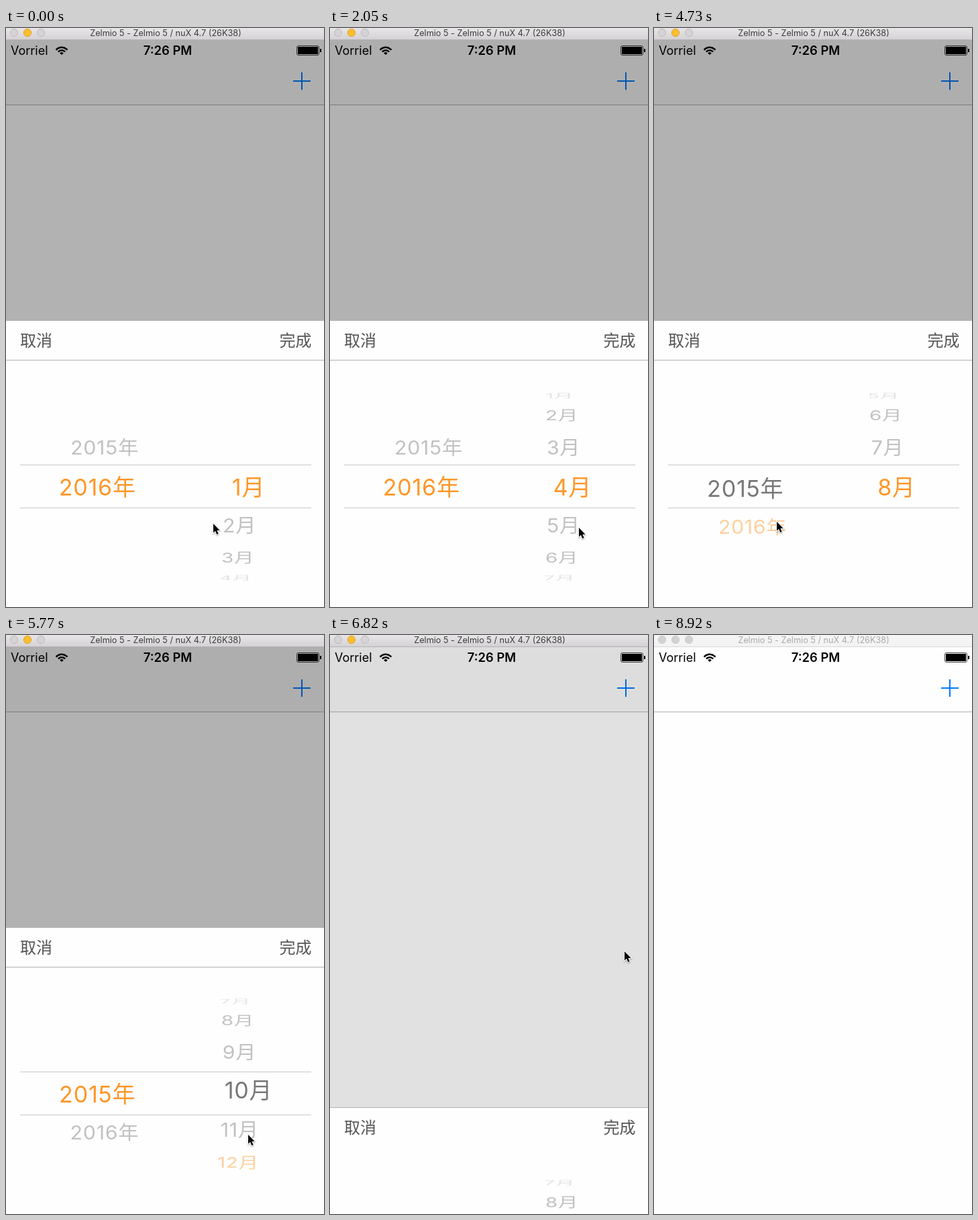
Recreate the animation shown at these times as an HTML page with a canvas. Size 474 by 862 pixels, loop 9.02 s.

```html
<!DOCTYPE html>
<html lang="zh">
<head>
<meta charset="utf-8">
<title>Month picker</title>
<style>
html, body { margin: 0; width: 100%; height: 100%; overflow: hidden; background: #fefefe; }
canvas { display: block; }
</style>
</head>
<body>
<canvas id="stage" width="474" height="862"></canvas>
<script>
const W = 474, H = 862, LOOP = 9020;
const ctx = document.getElementById('stage').getContext('2d');
const FONT = "Inter, 'Noto Sans CJK SC', 'Noto Sans CJK', 'Noto Sans CJK JP', sans-serif";
const ORANGE = '#ff9626', GRAY = '#777', LINE = '#b2b2b2';

// The picture is redrawn in ticks of about 149 ms; all times below are in ticks.
const tickAt = ms => Math.floor((ms + 45) / 149);

function ease(n, start, end) {
  const u = end > start ? Math.min(1, Math.max(0, (n - start) / (end - start))) : +(n >= end);
  return u * u * (3 - 2 * u);
}
const mix = (a, b, u) => a + (b - a) * u;

// Swipes that turn a wheel; fractional goals are overscrolls that spring back.
const swipe = (start, end, to) => ({ start, end, to });
const MONTH = [swipe(4, 10, 4), swipe(14, 17, 6), swipe(19, 22, 8.73), swipe(22, 26, 8),
  swipe(34, 34, 12), swipe(36, 39.4, 10)];
const YEAR = [swipe(28, 32, 2014.96), swipe(32, 34, 2015)];

const turned = (swipes, from, n) =>
  swipes.reduce((pos, s) => mix(pos, s.to, ease(n, s.start, s.end)), from);
// A row counts as chosen once the wheel has come to rest on it.
const chosen = (swipes, from, n) =>
  swipes.reduce((row, s) => n >= s.end && Number.isInteger(s.to) ? s.to : row, from);

// The pointer glides from place to place and rests in between.
const glide = (start, end, x, y) => ({ start, end, x, y });
const POINTER = [glide(0, 4, 355, 745), glide(4, 7, 362, 605), glide(8, 13, 371, 744),
  glide(14, 16, 380, 622), glide(16, 19, 376, 745), glide(19, 22, 364, 581), glide(23, 28, 180, 628),
  glide(28, 32, 183, 735), glide(32, 36, 358, 625), glide(36, 39, 361, 744), glide(40, 44, 439, 471),
  glide(47, 51, 438, 101), glide(53, 56, 300, 745)];
const pointerAt = n => POINTER.reduce((p, g) => {
  const u = ease(n, g.start, g.end);
  return { x: mix(p.x, g.x, u), y: mix(p.y, g.y, u) };
}, { x: 309, y: 738 });

function rect(x, y, w, h, color) {
  ctx.fillStyle = color;
  ctx.fillRect(x, y, w, h);
}
function label(str, x, y, size, color, align = 'left', weight = 400) {
  ctx.font = `${weight} ${size}px ${FONT}`;
  ctx.textAlign = align;
  ctx.fillStyle = color;
  ctx.fillText(str, x, y);
}
function disc(x, y, r, fill, stroke) {
  ctx.beginPath();
  ctx.arc(x, y, r, 0, 7);
  ctx.fillStyle = fill;
  ctx.fill();
  ctx.lineWidth = 1;
  ctx.strokeStyle = stroke;
  ctx.stroke();
}

function drawTitleBar(active) {
  const g = ctx.createLinearGradient(0, 0, 0, 17);
  g.addColorStop(0, active ? '#e8e6e8' : '#f5f5f5');
  g.addColorStop(1, active ? '#d4d2d4' : '#f3f3f3');
  rect(0, 0, W, 17, g);
  rect(0, 17, W, 1, active ? '#b4b2b4' : '#d6d6d6');
  for (const x of [12, 32, 52]) {
    if (active && x === 32) disc(x, 7, 5.6, '#fdbe2f', '#e0a023');
    else if (active) disc(x, 7, 5.6, '#d5d3d5', '#bcbabc');
    else disc(x, 7, 5.6, '#d2d2d2', '#cbcbcb');
  }
  label('Zelmio 5 - Zelmio 5 / nuX 4.7 (26K38)', 238, 12, 12.7, active ? '#3c3c3c' : '#a9a9a9', 'center');
}

function drawStatusBar() {
  label('Vorriel', 7, 40, 18, '#000');
  label('7:26 PM', 241, 40, 18.4, '#000', 'center', 600);

  const cx = 83, cy = 40, from = -Math.PI * 0.77, to = -Math.PI * 0.23;
  ctx.strokeStyle = '#000';
  ctx.lineWidth = 2.4;
  for (const r of [6.8, 11.2]) {
    ctx.beginPath();
    ctx.arc(cx, cy, r, from, to);
    ctx.stroke();
  }
  ctx.beginPath();
  ctx.moveTo(cx, cy);
  ctx.arc(cx, cy, 3.7, from, to);
  ctx.fill();

  ctx.lineWidth = 0.75;
  ctx.beginPath();
  ctx.roundRect(433.5, 26.5, 33, 14, 2.5);
  ctx.stroke();
  rect(435, 28, 30, 11, '#000');
  rect(468, 31, 2, 5, '#000');
}

function drawScreen(slide) {
  rect(0, 18, W, H, '#fefefe');
  rect(0, 18, W, 96, slide < 1 ? '#f9f9f9' : '#fefefe');
  rect(0, 114, W, 1, LINE);
  rect(428, 78, 26, 2, '#007aff');
  rect(440, 66, 2, 26, '#007aff');
  rect(0, 18, W, H, `rgba(0,0,0,${0.3 * (1 - slide)})`);
  drawStatusBar();
}

// Rows on a cylinder; coordinates are relative to the centre of the selection band.
const RADIUS = 158.4, ROW_ANGLE = 24 * Math.PI / 180, DEPTH = 1700, SMALL = 0.9;
function drawColumn(col, magnified) {
  for (let row = col.first; row <= col.last; row++) {
    const angle = (row - col.pos) * ROW_ANGLE;
    if (Math.abs(angle) > 1.5) continue;
    const cos = Math.cos(angle);
    const near = DEPTH / (DEPTH + RADIUS * (1 - cos));
    ctx.save();
    ctx.translate(col.x * near, RADIUS * Math.sin(angle));
    ctx.scale(near, cos);
    ctx.letterSpacing = '0.8px';
    ctx.globalAlpha = magnified ? 1 : 0.45 * Math.min(1, cos * 1.5);
    label(row + col.unit, 0, 13, 34, row === col.chosen ? ORANGE : GRAY, 'center');
    ctx.restore();
  }
}
function drawWheels(columns) {
  const bands = [[495, 155, false], [650, 65, true], [715, 147, false]];
  for (const [y, h, magnified] of bands) {
    ctx.save();
    ctx.beginPath();
    ctx.rect(0, y, W, h);
    ctx.clip();
    ctx.translate(237, 682.5);
    if (!magnified) ctx.scale(SMALL, SMALL);
    columns.forEach(col => drawColumn(col, magnified));
    ctx.restore();
  }
  for (const y of [650, 714]) rect(21, y, 434, 1, '#c8c8c8');
}

function drawPanel(n, slide) {
  const year = chosen(YEAR, 2016, n);
  ctx.save();
  ctx.translate(0, Math.round(slide * 427));
  rect(0, 436, W, 427, '#fefefe');
  rect(0, slide ? 435 : 494, W, 1, LINE);
  label('取消', 21, 474, 24, '#555');
  label('完成', 455.5, 474, 24, '#555', 'right');
  drawWheels([
    { x: -100.8, unit: '年', first: 2015, last: 2016, pos: turned(YEAR, 2016, n), chosen: year },
    { x: 124.5, unit: '月', first: 1, last: year === 2016 ? 8 : 12,
      pos: turned(MONTH, 1, n), chosen: chosen(MONTH, 1, n) }
  ]);
  ctx.restore();
}

function drawPointer({ x, y }) {
  ctx.save();
  ctx.translate(x, y);
  ctx.beginPath();
  [[0, 0], [0, 13.5], [3, 10.8], [5.3, 16], [7.7, 15], [5.4, 9.9], [9.6, 9.7]]
    .forEach(([px, py]) => ctx.lineTo(px, py));
  ctx.closePath();
  ctx.shadowColor = 'rgba(0,0,0,.35)';
  ctx.shadowBlur = 2;
  ctx.shadowOffsetY = 1;
  ctx.lineWidth = 2;
  ctx.strokeStyle = '#fff';
  ctx.stroke();
  ctx.shadowColor = 'transparent';
  ctx.fillStyle = '#000';
  ctx.fill();
  ctx.restore();
}

function draw() {
  const n = tickAt(performance.now() % LOOP);
  const slide = ease(n, 44.8, 46.85);
  drawScreen(slide);
  if (slide < 1) drawPanel(n, slide);
  drawTitleBar(n < 60);
  if (n < 57) drawPointer(pointerAt(n));
  requestAnimationFrame(draw);
}
draw();
</script>
</body>
</html>
```
